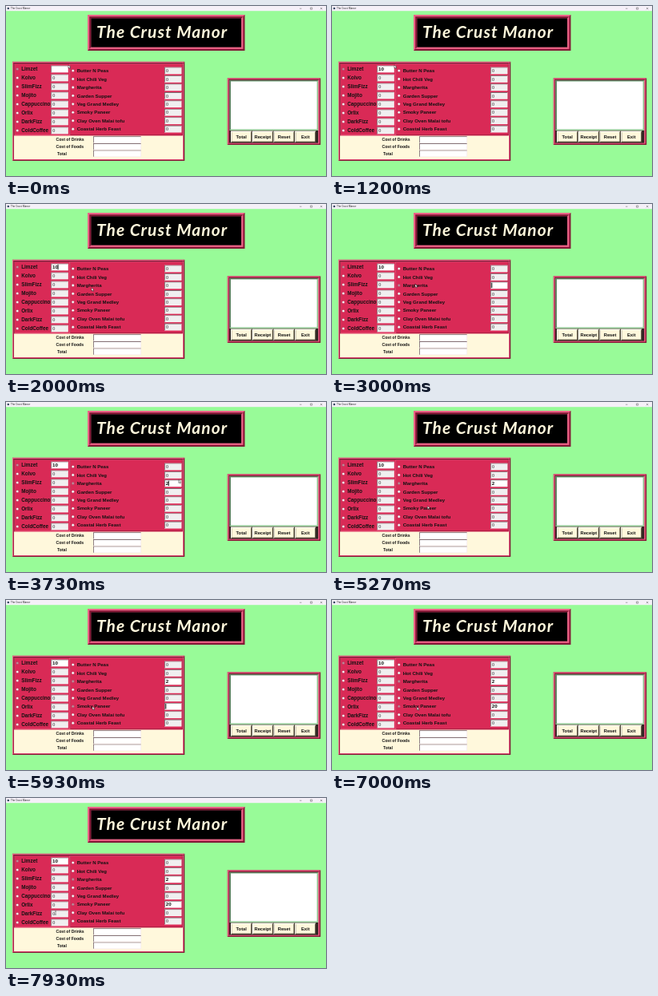
Write an HTML page that moves like this. It is 400 px wide and 213 px high and loops after 8000 ms.

```html
<!DOCTYPE html>
<html lang="en">
<head>
<meta charset="utf-8">
<title>The Crust Manor</title>
<style>
  html, body { margin: 0; width: 100%; height: 100%; overflow: hidden; background: #98fb98; }
  svg { display: block; width: 100%; height: 100%; }
  text { font-family: "Liberation Sans", Arial, sans-serif; font-weight: bold; fill: #111; }
  .sign { font: italic 700 21px Lato, "Noto Serif", sans-serif; letter-spacing: 1px; fill: #fff8dc; }
  .caption { font: 3.1px "Open Sans", "Noto Sans", sans-serif; }
</style>
</head>
<body>
<svg id="stage" viewBox="0 0 400 213"></svg>
<script>
const LOOP = 8000;
const RED = '#d92a56', RED_LIGHT = '#ea6387', RED_DARK = '#821735', CREAM = '#fff8dc';
const stage = document.getElementById('stage');

function add(tag, attrs, text = '') {
  const node = document.createElementNS('http://www.w3.org/2000/svg', tag);
  for (const key in attrs) node.setAttribute(key, attrs[key]);
  node.textContent = text;
  return stage.appendChild(node);
}
const rect = (x, y, width, height, fill) => add('rect', { x, y, width, height, fill });
const label = (x, y, size, text, extra = {}) => add('text', { x, y, 'font-size': size, ...extra }, text);

// A box whose top-left and bottom-right edges have different shades.
function bevel(x, y, w, h, depth, topLeft, bottomRight, fill) {
  rect(x, y, w, h, bottomRight);
  add('path', {
    d: `M${x} ${y + h}V${y}H${x + w}l${-depth} ${depth}H${x + depth}V${y + h - depth}Z`,
    fill: topLeft
  });
  return rect(x + depth, y + depth, w - 2 * depth, h - 2 * depth, fill);
}

// Raised outer half, sunken inner half.
function ridge(x, y, w, h, depth, fill) {
  const half = depth / 2;
  bevel(x, y, w, h, half, RED_LIGHT, RED_DARK, RED);
  bevel(x + half, y + half, w - depth, h - depth, half, RED_DARK, RED_LIGHT, fill);
}

function entry(x, y, w, h, fill) {
  return bevel(x, y, w, h, 0.9, '#77656b', '#f7eef0', fill);
}

function menuRow(text, x, y, entryX, size) {
  const mark = add('circle', { cx: x, cy: y, r: 1.6, stroke: '#9c4a62', 'stroke-width': 0.4 });
  label(x + 5, y + 2.2, size, text);
  const box = entry(entryX, y - 4.3, 21.5, 8.7, '#f0eff0');
  const value = label(entryX + 1.8, y + 2.2, 6.2, '0');
  const caret = rect(entryX + 1.3, y - 3.2, 1, 6.4, '#111');
  return { mark, box, value, caret, entryX };
}

function drawWindow() {
  rect(0, 0, 400, 213, '#98fb98');
  rect(0, 0, 400, 6.2, '#f5f0f8');
  add('circle', { cx: 2.8, cy: 3, r: 1.3, fill: '#35445f' });
  add('text', { x: 6, y: 4.1, class: 'caption' }, 'The Crust Manor');
  add('path', {
    d: 'M367 3.2h2.5M380.5 2h2.2v2.2h-2.2zM393 2l2.3 2.3M395.3 2l-2.3 2.3',
    fill: 'none', stroke: '#444', 'stroke-width': 0.45
  });
  ridge(102, 11, 196.5, 45, 4.4, '#000');
  add('text', { x: 113, y: 40.2, class: 'sign' }, 'The Crust Manor');
}

function drawTotals() {
  rect(10, 162.5, 211, 29.5, CREAM);
  ['Cost of Drinks', 'Cost of Foods', 'Total'].forEach((text, i) => {
    label(i === 2 ? 64 : 62.5, 169.4 + i * 8.6, 5.15, text);
    entry(109, 163.3 + i * 8.7, 60, 8.5, '#fff');
  });
}

function drawReceipt() {
  ridge(276.8, 90.3, 116.4, 83.7, 3, RED);
  bevel(279.4, 92.9, 110.8, 63.1, 1.6, '#5d7f60', '#93c795', '#fff');
  rect(279.4, 156, 110.8, 15.6, '#2c2420');
  ['Total', 'Receipt', 'Reset', 'Exit'].forEach((text, i) => {
    const x = 281 + i * 26.7;
    bevel(x, 156.6, 26.4, 14.4, 1.3, '#fffdf2', '#4d4535', CREAM);
    label(x + 13.2, 165.7, 5.75, text, { 'text-anchor': 'middle' });
  });
}

drawWindow();
ridge(8, 69.8, 215.3, 124.2, 2.6, RED);
drawTotals();
bevel(10.6, 72.4, 69.4, 89.6, 0.5, RED_DARK, RED_LIGHT, RED);
bevel(80, 72.4, 140.7, 89.6, 0.5, RED_LIGHT, RED_DARK, RED);
const drinks = ['Limzet', 'Kolvo', 'SlimFizz', 'Mojito', 'Cappuccino', 'Orlix', 'DarkFizz', 'ColdCoffee']
  .map((text, i) => menuRow(text, 14.2, 79 + i * 11, 56.3, 6.35));
const foods = ['Butter N Peas', 'Hot Chili Veg', 'Margherita', 'Garden Supper', 'Veg Grand Medley',
  'Smoky Paneer', 'Clay Oven Malai tofu', 'Coastal Herb Feast']
  .map((text, i) => menuRow(text, 83.7, 81 + i * 10.45, 198, 6.05));
drawReceipt();

const arrow = add('path', {
  d: 'M0 0v4l1 -.9 .8 1.6 .7 -.3 -.8 -1.6h1.3z', fill: '#fff', stroke: '#111', 'stroke-width': 0.4
});
const beam = add('path', {
  d: 'M-.9 -2.2h1.8M0 -2.2v4.4M-.9 2.2h1.8', fill: 'none', stroke: '#333', 'stroke-width': 0.45
});

// Each order: row, then steps of [time, text, start of caret blink].
const orders = [
  { row: drinks[0], steps: [[0, '', -650], [700, '1', 550], [870, '10', 550]] },
  { row: foods[2], steps: [[2600, '', 2600], [3700, '2', 3700]] },
  { row: foods[5], steps: [[5600, '', 5600], [6200, '2', 6200], [6400, '20', 6400]] }
];
const pointer = [
  [0, 78, 74], [1470, 78, 74], [1800, 107, 105], [2100, 107, 105], [2500, 104, 100.5],
  [3200, 104, 100.5], [3900, 235, 97], [4700, 235, 97], [5400, 108, 133.5],
  [6900, 108, 133.5], [7750, 62, 144], [LOOP, 62, 144]
];

function pointerAt(t) {
  const i = pointer.findIndex(p => p[0] > t);
  const [t0, x0, y0] = pointer[i - 1], [t1, x1, y1] = pointer[i];
  const k = (t - t0) / (t1 - t0), ease = k * k * (3 - 2 * k);
  return [x0 + (x1 - x0) * ease, y0 + (y1 - y0) * ease];
}

const show = (node, on) => node.setAttribute('visibility', on ? 'visible' : 'hidden');

function setRow(row, step, focused, t) {
  row.box.setAttribute('fill', step ? '#fff' : '#f0eff0');
  row.mark.setAttribute('fill', step ? '#c38a9a' : '#fff');
  row.value.style.fill = step ? '#111' : '#77777a';
  row.value.textContent = step ? step[1] : '0';
  show(row.caret, focused && (t - step[2]) % 900 < 600);
  if (step) row.caret.setAttribute('x', row.entryX + 1.3 + step[1].length * 3.45);
}

function render(t) {
  const active = orders.filter(o => o.steps[0][0] <= t).pop();
  for (const order of orders) {
    const step = order.steps.filter(s => s[0] <= t).pop();
    setRow(order.row, step, order === active, t);
  }
  const [x, y] = pointerAt(t);
  const overEntry = x > 57 && x < 77;
  for (const node of [arrow, beam]) node.setAttribute('transform', `translate(${x} ${y})`);
  show(arrow, !overEntry);
  show(beam, overEntry);
}

[...drinks, ...foods].forEach(row => setRow(row, null, false, 0));
const start = performance.now();
function frame() {
  render((performance.now() - start) % LOOP);
  requestAnimationFrame(frame);
}
frame();
</script>
</body>
</html>
```
